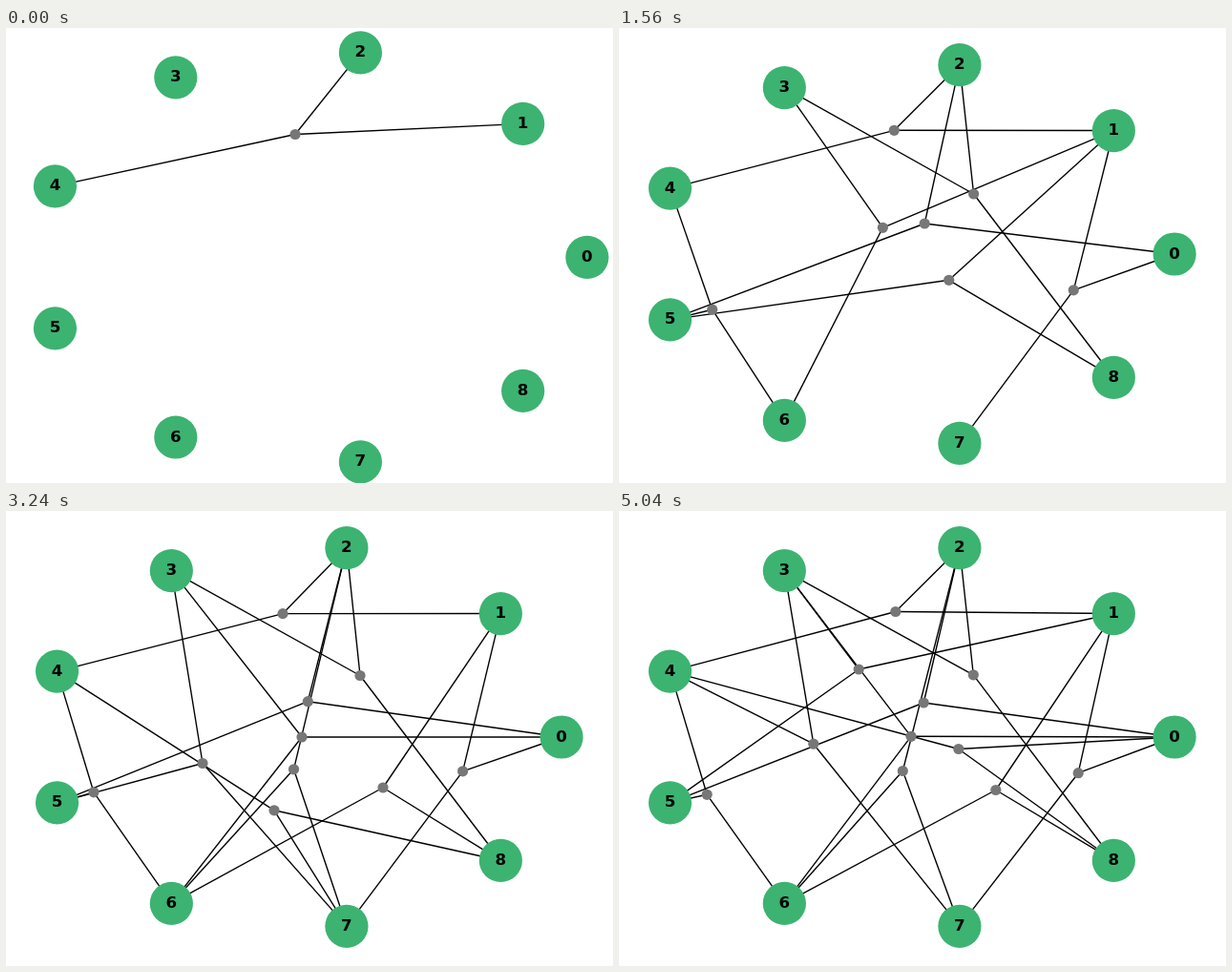
An HTML page with a canvas for the animation above (6890 ms loop, 636 by 477 pixels).

```html
<!DOCTYPE html>
<html lang="en">
<head>
<meta charset="utf-8">
<title>Triples on nine points</title>
<style>
html, body { margin: 0; width: 100%; height: 100%; overflow: hidden; background: #fff; }
canvas { display: block; }
</style>
</head>
<body>
<canvas id="stage" width="636" height="477"></canvas>
<script>
const ctx = document.getElementById('stage').getContext('2d');
const LOOP = 6890;

// Each step: start time, triple added, triple dropped.
const STEPS = [
  [0, '124'], [360, '136'], [600, '017'], [840, '158'], [1080, '238'],
  [1320, '025'], [1560, '456'], [1800, '357'], [2040, '048'], [2280, '267'],
  [2640, '036', '136'], [2880, '168', '158'], [3000], [3240, '478', '048'],
  [3480, '158', '168'], [3720, '048', '478'], [3960, '347', '357'],
  [4320, '136', '036'], [4560, '036', '136'], [4800, '168', '158'], [5040, '135']
];

// Hub poses, one for each of these steps at which the triple exists.
const POSE_STEPS = [0, 2, 6, 10, 13, 17, 20];
const HUBS = {
  '124': [[292.1, 117.8], [288.5, 112.5], [288.3, 107.3], [289.2, 105.8], [290, 107.6], [287.2, 106.3], [289.8, 105.5]],
  '136': [[287.2, 209.7], [276.4, 209.3], [279.2, 205]],
  '017': [[469.8, 272.6], [476.3, 274.8], [480, 274.8], [478.6, 272.8], [478.8, 275], [481.2, 274.7]],
  '158': [[345.7, 264.3], [349.8, 267.3], [348.8, 267.5]],
  '238': [[371.6, 174], [371.8, 172], [371, 172.5], [372.3, 172], [371.3, 171.8]],
  '025': [[320.2, 205], [314.3, 198], [316.3, 199.7], [320.3, 201.2], [319.2, 201]],
  '456': [[97.7, 295.2], [92.3, 295.3], [91.9, 294.8], [91.8, 296.2], [92.2, 297.3]],
  '357': [[206, 264.8], [206, 264.5]],
  '048': [[359.8, 243.8], [357.8, 244.5], [355.8, 249.5]],
  '267': [[295.4, 273.8], [301.5, 270.8], [297.8, 273], [297.3, 272.5]],
  '036': [[303.4, 235.8], [310, 237], [306, 236.3]],
  '168': [[395, 290], [394.8, 292.5]],
  '478': [[281, 313.8]],
  '347': [[204.6, 243.7], [203.8, 244.2]],
  '135': [[251.2, 166]]
};

// The view settles over the first three steps.
const VIEWS = [
  { cx: 321.5, cy: 240.4, rx: 287.4, ry: 217.8 },
  { cx: 321.5, cy: 246.8, rx: 287.4, ry: 211.6 },
  { cx: 309.6, cy: 237, rx: 272.5, ry: 201.4 }
];
const BASE = VIEWS[2];

const alive = [];
STEPS.reduce((now, [, add, drop]) => {
  const next = now.filter(t => t !== drop);
  if (add) next.push(add);
  alive.push(next);
  return next;
}, []);

const poses = {};
for (const t in HUBS) {
  poses[t] = POSE_STEPS.filter(s => alive[s].includes(t)).map((s, i) => [s, ...HUBS[t][i]]);
}

function hubAt(triple, step, view) {
  const keys = poses[triple];
  const after = keys.find(k => k[0] >= step) || keys[keys.length - 1];
  const before = keys.filter(k => k[0] <= step).pop() || after;
  const gap = after[0] - before[0];
  const p = gap > 0 ? (step - before[0]) / gap : 0;
  const x = before[1] + (after[1] - before[1]) * p;
  const y = before[2] + (after[2] - before[2]) * p;
  return [
    view.cx + (x - BASE.cx) / BASE.rx * view.rx,
    view.cy + (y - BASE.cy) / BASE.ry * view.ry
  ];
}

function nodeAt(i, view) {
  const a = i * Math.PI * 2 / 9;
  return [view.cx + view.rx * Math.cos(a), view.cy - view.ry * Math.sin(a)];
}

function disc([x, y], r, color) {
  ctx.fillStyle = color;
  ctx.beginPath();
  ctx.arc(x, y, r, 0, Math.PI * 2);
  ctx.fill();
}

function draw(step) {
  const view = VIEWS[Math.min(step, 2)];
  const nodes = Array.from({ length: 9 }, (_, i) => nodeAt(i, view));
  const hubs = alive[step].map(t => hubAt(t, step, view));

  ctx.fillStyle = '#fff';
  ctx.fillRect(0, 0, 636, 477);

  ctx.strokeStyle = '#000';
  ctx.lineWidth = 1.39;
  alive[step].forEach((triple, i) => {
    for (const n of triple) {
      ctx.beginPath();
      ctx.moveTo(...hubs[i]);
      ctx.lineTo(...nodes[n]);
      ctx.stroke();
    }
  });

  hubs.forEach(h => disc(h, 5.6, '#777'));
  nodes.forEach(n => disc(n, 22.6, '#3cb371'));

  ctx.fillStyle = '#000';
  ctx.font = 'bold 16.67px "DejaVu Sans", sans-serif';
  ctx.textAlign = 'center';
  nodes.forEach(([x, y], i) => ctx.fillText(i, x, Math.round(y + 4.5)));
}

let shown = -1;
function tick() {
  const t = performance.now() % LOOP;
  const step = STEPS.filter(s => s[0] <= t).length - 1;
  if (step !== shown) draw(shown = step);
  requestAnimationFrame(tick);
}
tick();
</script>
</body>
</html>
```
